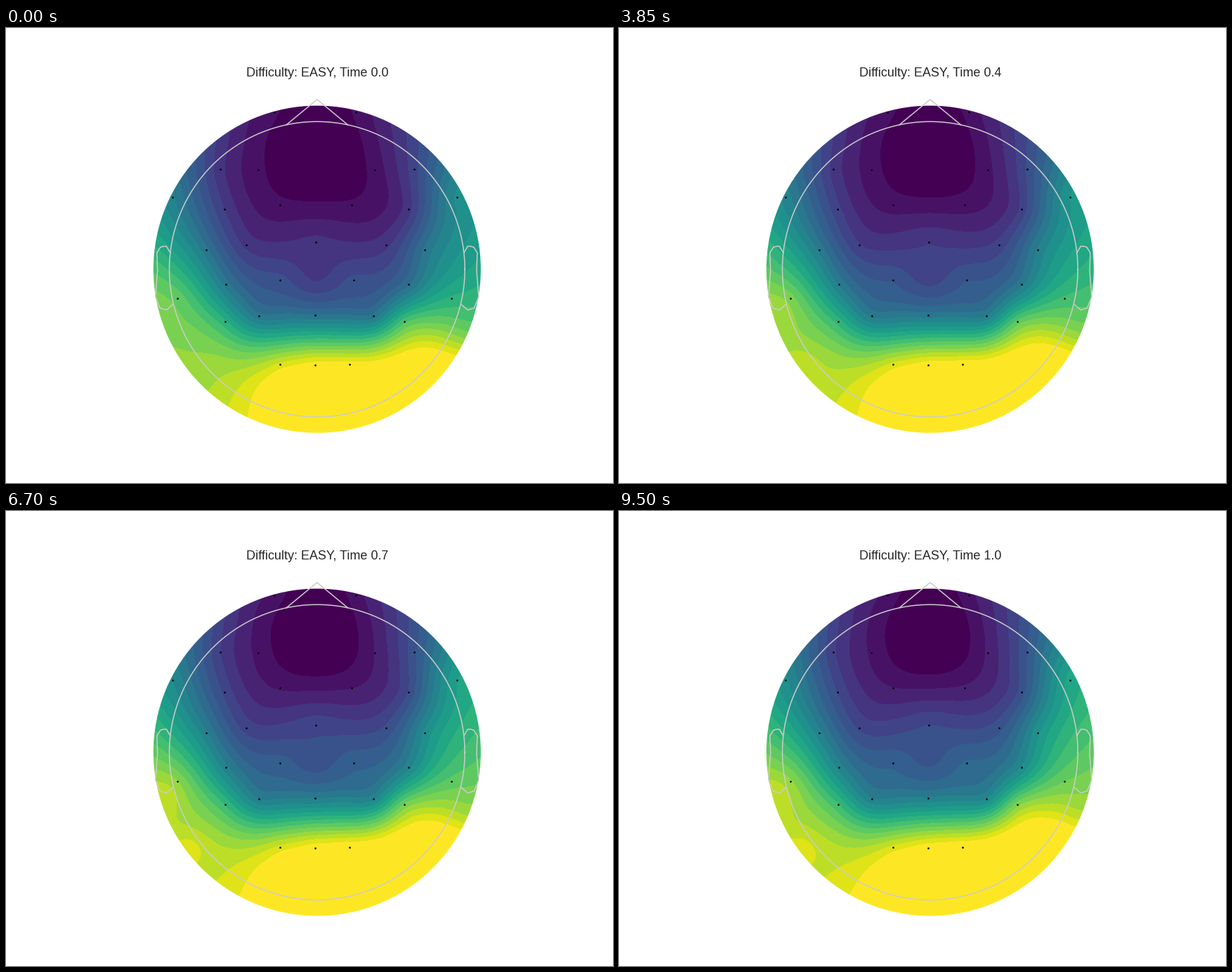
A matplotlib script that plays this animation: 864x648 px, repeating every 10 s.

```python
import numpy as np
import matplotlib.pyplot as plt
from matplotlib.animation import FuncAnimation
from matplotlib.patches import Circle

W, H, DPI = 864, 648, 108
CX, CY, HEAD, SKIRT = 442.8, 343.6, 210.3, 233
STEP, LOOP = 50, 10000

# mirrored electrodes: left x, right x, y, left level, right level
PAIRS = [
    (382, 498, 120, .06, .06), (359, 524.5, 202, .065, .07),
    (304.5, 580.5, 201, .17, .23), (237, 641.5, 241, .46, .51),
    (390, 491.5, 252, .065, .06), (311, 572.5, 257.5, .2, .18),
    (342, 540.5, 308.5, .185, .185), (284.5, 595.5, 316, .42, .41),
    (389.5, 494.5, 359, .27, .265), (312.5, 572.5, 365, .43, .39),
    (243.5, 634, 385, .79, .66), (360, 523, 410, .42, .42),
    (312, 567, 417.5, .66, .73), (390, 489, 479, .965, 1.03)]
MIDLINE = [(440.5, 304.5, .165), (440, 408.5, .4), (439.5, 479.5, 1.03)]
# shape of the map between the electrodes
INNER = [(443, 180, -.03), (441, 355, .19), (600, 455, 1), (262, 482, .88),
         (300, 470, .86), (355, 515, 1)]
# levels around the rim, clockwise from the nose
RIM = [0, .12, .32, .53, .62, .8, 1.25, 1.3,
       1.2, 1.02, .89, .84, .74, .5, .27, .09]
# spells of motion: first refresh, last refresh, number of refreshes
SPELLS = [(0, 0, 1), (500, 800, 3), (1200, 2000, 5), (2350, 2550, 3),
          (2900, 3550, 6), (3850, 4750, 7), (5000, 5000, 1),
          (5300, 6200, 7), (6500, 7150, 5), (7500, 7700, 3),
          (8000, 8850, 6), (9250, 9500, 3)]


def kernel(x, y, px, py):
    r2 = ((x - px) ** 2 + (y - py) ** 2) / SKIRT ** 2
    return r2 * np.log(r2 + 1e-12) / 2


def spline(nodes, x, y, smooth=2e-4):
    """Thin-plate spline through (x, y, level) nodes, evaluated at x, y."""
    px, py, values = nodes.T
    n = len(px)
    a = np.zeros((n + 3, n + 3))
    a[:n, :n] = kernel(px[:, None], py[:, None], px, py) + smooth * np.eye(n)
    a[:n, n:] = np.column_stack(
        [np.ones(n), (px - CX) / SKIRT, (py - CY) / SKIRT])
    a[n:, :n] = a[:n, n:].T
    c = np.linalg.solve(a, np.append(values, [0, 0, 0]))
    out = c[n] + c[n + 1] * (x - CX) / SKIRT + c[n + 2] * (y - CY) / SKIRT
    for k in range(n):
        out = out + c[k] * kernel(x, y, px[k], py[k])
    return out


def bump(cx, cy, width):
    return np.exp(-((gx - cx) ** 2 + (gy - cy) ** 2) / (2 * width ** 2))


X0, Y0, SIZE = 209, 109, 468
gx, gy = np.meshgrid(X0 + .5 + np.arange(SIZE), Y0 + .5 + np.arange(SIZE))

electrodes = np.array([(xl, y, vl) for xl, _, y, vl, _ in PAIRS]
                      + [(xr, y, vr) for _, xr, y, _, vr in PAIRS] + MIDLINE)
turn = np.linspace(0, 2 * np.pi, len(RIM), endpoint=False)
rim = np.column_stack([CX + SKIRT * np.sin(turn),
                       CY - SKIRT * np.cos(turn), RIM])
base = spline(np.vstack([electrodes, INNER, rim]), gx, gy)

# slow rise everywhere but at the brow and the back, strongest on the right
drift = (.055 * (1 - bump(443, 170, 80) - bump(400, 500, 70))
         + .045 * bump(441, 335, 50) + .1 * bump(670, 340, 100))
flicker = bump(258, 482, 20) + bump(222, 408, 24)

ticks = np.concatenate([np.linspace(*spell) for spell in SPELLS])
bands = plt.get_cmap("viridis")(np.linspace(0, 1, 21), bytes=True)


def topomap(t):
    p = t / ticks[-1]
    ease = p * p * (3 - 2 * p)
    wave = .06 * ease + .02 * np.cos(2 * np.pi * (t - 1450) / 2400)
    level = base + ease * drift + wave * flicker
    return bands[np.clip(np.floor(level * 20), 0, 20).astype(int)]


def title(t):
    return f"Difficulty: EASY, Time {round(t / 1000) / 10:.1f}"


fig = plt.figure(figsize=(W / DPI, H / DPI), dpi=DPI, facecolor="white")
ax = fig.add_axes([0, 0, 1, 1])
image = ax.imshow(topomap(0), extent=(X0, X0 + SIZE, Y0 + SIZE, Y0),
                  aspect="auto", interpolation="nearest")
image.set_clip_path(Circle((CX, CY), SKIRT, transform=ax.transData))
ax.set(xlim=(0, W), ylim=(H, 0))
ax.axis("off")


def outline(x, y):
    ax.plot(CX + HEAD * np.array(x), CY - HEAD * np.array(y),
            color="0.8", lw=1, zorder=3)


ang = np.linspace(0, 2 * np.pi, 201)
outline(np.cos(ang), np.sin(ang))
nose = np.deg2rad(12)
outline([-np.sin(nose), 0, np.sin(nose)], [np.cos(nose), 1.15, np.cos(nose)])
ear_x = 2 * np.array([.497, .510, .518, .530, .542, .540, .547, .532,
                      .510, .489])
ear_y = 2 * np.array([.056, .078, .078, .075, .056, -.006, -.093, -.131,
                      -.138, -.120])
outline(ear_x, ear_y)
outline(-ear_x, ear_y)
ax.plot(electrodes[:, 0], electrodes[:, 1], "o", color="black", ms=1.8,
        mew=0, zorder=4)
label = ax.text(CX, 68.76, title(0), family="Liberation Sans", size=12,
                color="0.15", ha="center", va="baseline")


def update(i):
    t = i * STEP
    image.set_data(topomap(ticks[ticks <= t][-1]))
    label.set_text(title(t))
    return image, label


anim = FuncAnimation(fig, update, frames=LOOP // STEP, interval=STEP,
                     repeat=True, repeat_delay=0, blit=False)
plt.show()
```
